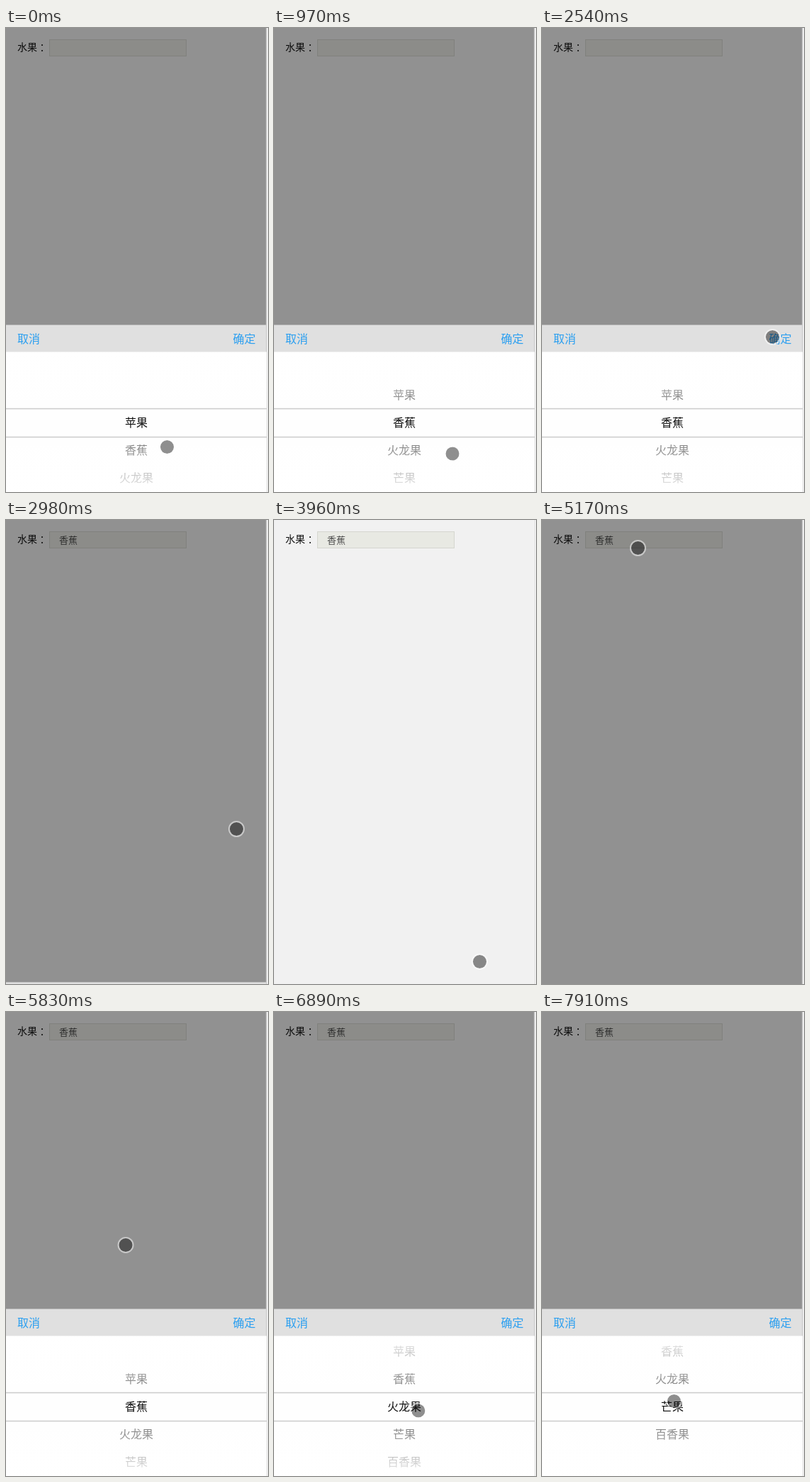
An HTML page for the animation above (8000 ms loop, 370 px wide and 654 px high).

```html
<!DOCTYPE html>
<html lang="zh-CN">
<head>
<meta charset="utf-8">
<title>水果选择</title>
<style>
html, body { margin: 0; width: 100%; height: 100%; overflow: hidden; background: #fafafa; }
svg { display: block; width: 370px; height: 654px; }
text { font-family: "Noto Sans CJK SC", "Noto Sans CJK", "Noto Sans", sans-serif; font-size: 16px; }
.label { font-size: 14px; fill: #111; }
.value { font-size: 13px; fill: #4a4a4a; }
.button { fill: #2b9ff0; }
.row { fill: #111; text-anchor: middle; }
</style>
</head>
<body>
<svg viewBox="0 0 370 654">
  <defs>
    <linearGradient id="fadeTop" x1="0" y1="0" x2="0" y2="1">
      <stop offset="0" stop-color="#fff" stop-opacity=".95"/>
      <stop offset="1" stop-color="#fff" stop-opacity=".42"/>
    </linearGradient>
    <linearGradient id="fadeBottom" x1="0" y1="0" x2="0" y2="1">
      <stop offset="0" stop-color="#fff" stop-opacity=".42"/>
      <stop offset="1" stop-color="#fff" stop-opacity=".95"/>
    </linearGradient>
    <clipPath id="wheelClip"><rect y="457" width="368" height="197"/></clipPath>
  </defs>

  <rect width="370" height="654" fill="#f1f1f1"/>
  <text class="label" x="16" y="32">水果</text>
  <text class="label" x="47.5" y="32">：</text>
  <rect x="61.5" y="16.5" width="193" height="23" fill="#e8e9e3" stroke="#d5d6cf"/>
  <text class="value" id="value" x="75" y="33">香蕉</text>
  <rect id="shade" width="367.5" height="654" fill="#000" fill-opacity=".4"/>

  <g id="sheet">
    <rect y="418.5" width="367.5" height="38.5" fill="#e0e0e0"/>
    <rect y="456.5" width="368" height="198" fill="#fefefe"/>
    <text class="button" x="16" y="444">取消</text>
    <text class="button" x="320.5" y="444">确定</text>
    <g clip-path="url(#wheelClip)"><g id="wheel"></g></g>
    <rect y="457" width="368" height="79" fill="url(#fadeTop)"/>
    <rect y="577" width="368" height="79" fill="url(#fadeBottom)"/>
    <rect y="535.8" width="368" height="1.6" fill="#cdcdcd"/>
    <rect y="575.8" width="368" height="1.6" fill="#cdcdcd"/>
  </g>

  <rect x="368" width="2" height="654" fill="#f8f8f8"/>
  <rect x="368" width="1" height="654" fill="#dedede"/>

  <g id="cursor">
    <circle r="9.6" fill="#000" fill-opacity=".44"/>
    <circle r="10.5" fill="none" stroke="#fff" stroke-opacity=".5" stroke-width="2"/>
  </g>
</svg>
<script>
const LOOP = 8000;
const ROW = 39;
const HOLD = 132;
const el = id => document.getElementById(id);
const fruits = ["苹果", "香蕉", "火龙果", "芒果", "百香果"];

// The screen refreshes only inside these spans, once per HOLD.
const bursts = [
  [0, 970], [1810, 2540], [2850, 3370], [3960, 4770],
  [5050, 5970], [6100, 7130], [7270, 7520], [7790, 7910]
];

// Each move: start, end, then the values reached.
const pointer = [
  [0, 0, 227.5, 590.5],
  [150, 470, 282, 635],       // reach for the wheel
  [470, 970, 252, 600],       // drag one row
  [1700, 2540, 325.5, 435.5], // confirm
  [3000, 3370, 290.5, 622.5],
  [3960, 4850, 135.5, 39.5],  // tap the field
  [5250, 5840, 168.5, 326.5],
  [5840, 6390, 243, 592],
  [6390, 6830, 214, 552],     // drag again
  [6830, 7130, 186.5, 579],
  [7130, 7520, 186.5, 548.5]
];
const scroll = [[0, 0, 0], [470, 970, 1], [6390, 6900, 2], [7130, 7520, 2.78], [7700, 7910, 3]];
const slide = [[0, 0, 0], [2740, 3010, 1], [5190, 5600, 0]];

const easeOut = p => 1 - (1 - p) ** 2;

function follow(moves, t) {
  let now = moves[0].slice(2);
  for (const [from, to, ...goal] of moves.slice(1)) {
    const p = easeOut(Math.min(1, Math.max(0, (t - from) / (to - from))));
    now = now.map((v, i) => v + (goal[i] - v) * p);
  }
  return now;
}

function refreshTime(t) {
  const [from, to] = bursts.filter(b => b[0] <= t).pop();
  const step = Math.floor((t - from + 15) / HOLD);
  return t >= to ? to : Math.min(to, from + step * HOLD);
}

const show = (id, on) => el(id).setAttribute("visibility", on ? "visible" : "hidden");
const move = (id, x, y) => el(id).setAttribute("transform", `translate(${x} ${y})`);

fruits.forEach((name, i) => {
  const row = document.createElementNS("http://www.w3.org/2000/svg", "text");
  row.setAttribute("class", "row");
  row.setAttribute("x", 184);
  row.setAttribute("y", 562 + i * ROW);
  row.textContent = name;
  el("wheel").append(row);
});

function draw(now) {
  const t = refreshTime(now % LOOP);
  const open = t < 3100 || t >= 5160;
  move("cursor", ...follow(pointer, t));
  move("wheel", 0, -ROW * follow(scroll, t)[0]);
  move("sheet", 0, 235.5 * follow(slide, t)[0]);
  show("value", t >= 2850);
  show("shade", open);
  show("sheet", open);
}

const start = performance.now();
function frame() {
  draw(performance.now() - start);
  requestAnimationFrame(frame);
}
frame();
</script>
</body>
</html>
```
